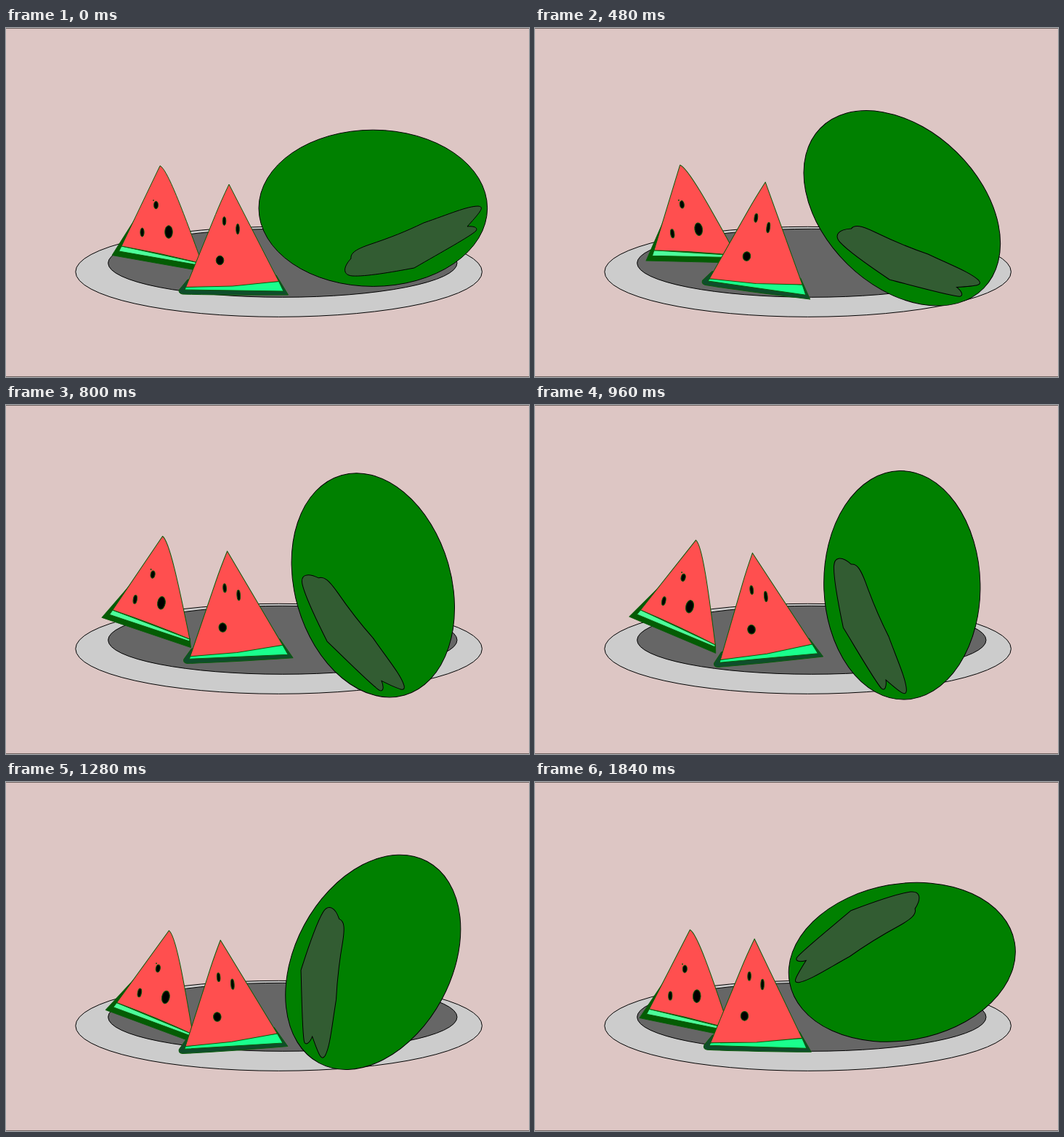
Animation of 720x480 px, one loop 1.92 s. Source, as an HTML page:

```html
<!DOCTYPE html>
<html lang="en">
<head>
<meta charset="utf-8">
<title>Watermelon plate</title>
<style>
  html, body { margin: 0; width: 100%; height: 100%; overflow: hidden; background: #ddc6c4; }
  svg { display: block; width: 720px; height: 480px; }
</style>
</head>
<body>
<svg viewBox="0 0 720 480" stroke="#000" stroke-width="1">
  <rect x="-2" y="0" width="724" height="480" fill="#ddc6c4"/>
  <ellipse cx="375.6" cy="335.3" rx="279.8" ry="62" fill="#ccc"/>
  <ellipse cx="380.8" cy="323.3" rx="240.2" ry="47" fill="#666"/>

  <g id="left" stroke="#0b5c0b" stroke-linejoin="round">
    <path fill="#045c04" d="M178 262 L146 312.5 L273 335 L270 323 Z"/>
    <path fill="#4dff9a" d="M159 300 L155.5 307 L270 327 V324 Z"/>
    <path fill="#ff4f4f" d="M212 189.5 L159 300 Q215 310 270 324 C243 250 222 194 212 189.5 Z"/>
    <g fill="#000">
      <ellipse cx="206.5" cy="243.5" rx="3" ry="5.2"/>
      <ellipse cx="187.5" cy="281" rx="2.6" ry="6"/>
      <ellipse cx="224" cy="280.5" rx="5.3" ry="8.8"/>
      <circle cx="203" cy="237" r=".5"/>
    </g>
  </g>

  <g id="right" stroke="#0b5c0b" stroke-linejoin="round">
    <path fill="#0f4d2b" d="M250 346 L238.5 360 Q237 365 243 366 Q290 367.5 388.5 367 L372 340 Z"/>
    <path fill="#1aff8d" d="M247.5 356.5 L246 360 L382 362 L375.5 348.5 Z"/>
    <path fill="#ff4f4f" d="M307 215 Q296 238 288.5 256.5 L247.5 356.5 L312 355 L375.5 348.5 Z"/>
    <g fill="#000">
      <ellipse cx="300.5" cy="265.5" rx="2.3" ry="6"/>
      <ellipse cx="319" cy="276.5" rx="2.3" ry="7.2"/>
      <ellipse cx="294.5" cy="319.5" rx="5.3" ry="6.3"/>
    </g>
  </g>

  <g id="melon">
    <ellipse cx="505.3" cy="247.8" rx="157.3" ry="107.6" fill="#008000"/>
    <path fill="#325c32" d="M575 268 C610 256 635 245 650 245 C658 246 656 250 635 273
      C645 272 650 275 647 279 C640 286 600 308 562 330 C530 336 495 342 477 341
      C464 340 463 330 475 317 C474 309 483 304 500 298 C530 288 550 280 575 268 Z"/>
  </g>
</svg>
<script>
  const STEP = 80, STEPS = 24, TURN = 170;
  const byId = id => document.getElementById(id);
  const melon = byId("melon"), left = byId("left"), right = byId("right");

  const ramp = (step, from, to) => Math.min(1, Math.max(0, (step - from) / (to - from)));

  // A slice leans one way, hops while leaning the other way, lands, then settles.
  function rock(node, step, { pivot, lean, counter, rest, hop, land, settled, stretch }) {
    const away = ramp(step, 0, 5), back = ramp(step, 5, 11);
    const drop = ramp(step, 11, 15), calm = ramp(step, 15, settled);
    const angle = lean * (away - back) + counter * (back - calm) + rest * calm;
    const [x, y] = pivot.map((p, i) => p + hop[i] * (back - drop) + land[i] * drop);
    const grow = stretch * calm;
    node.setAttribute("transform", `translate(${x} ${y}) rotate(${angle})
      scale(${1 - grow} ${1 + grow}) translate(${-pivot[0]} ${-pivot[1]})`);
  }

  function draw(ms) {
    const step = Math.floor(ms / STEP) % STEPS;
    melon.setAttribute("transform", `rotate(${TURN * step / (STEPS - 1)} 505.3 247.8)`);
    rock(left, step, {
      pivot: [213, 262.3], lean: -13, counter: 12.8, rest: 1.6,
      hop: [-8.7, -11.6], land: [-0.7, 13.8], settled: 19.6, stretch: 0
    });
    rock(right, step, {
      pivot: [313, 291], lean: 10, counter: -6.1, rest: 0.8,
      hop: [2.5, -17.4], land: [-6, 2.1], settled: 19, stretch: 0.016
    });
  }

  const start = performance.now();
  function tick() {
    draw(performance.now() - start);
    requestAnimationFrame(tick);
  }
  tick();
</script>
</body>
</html>
```
